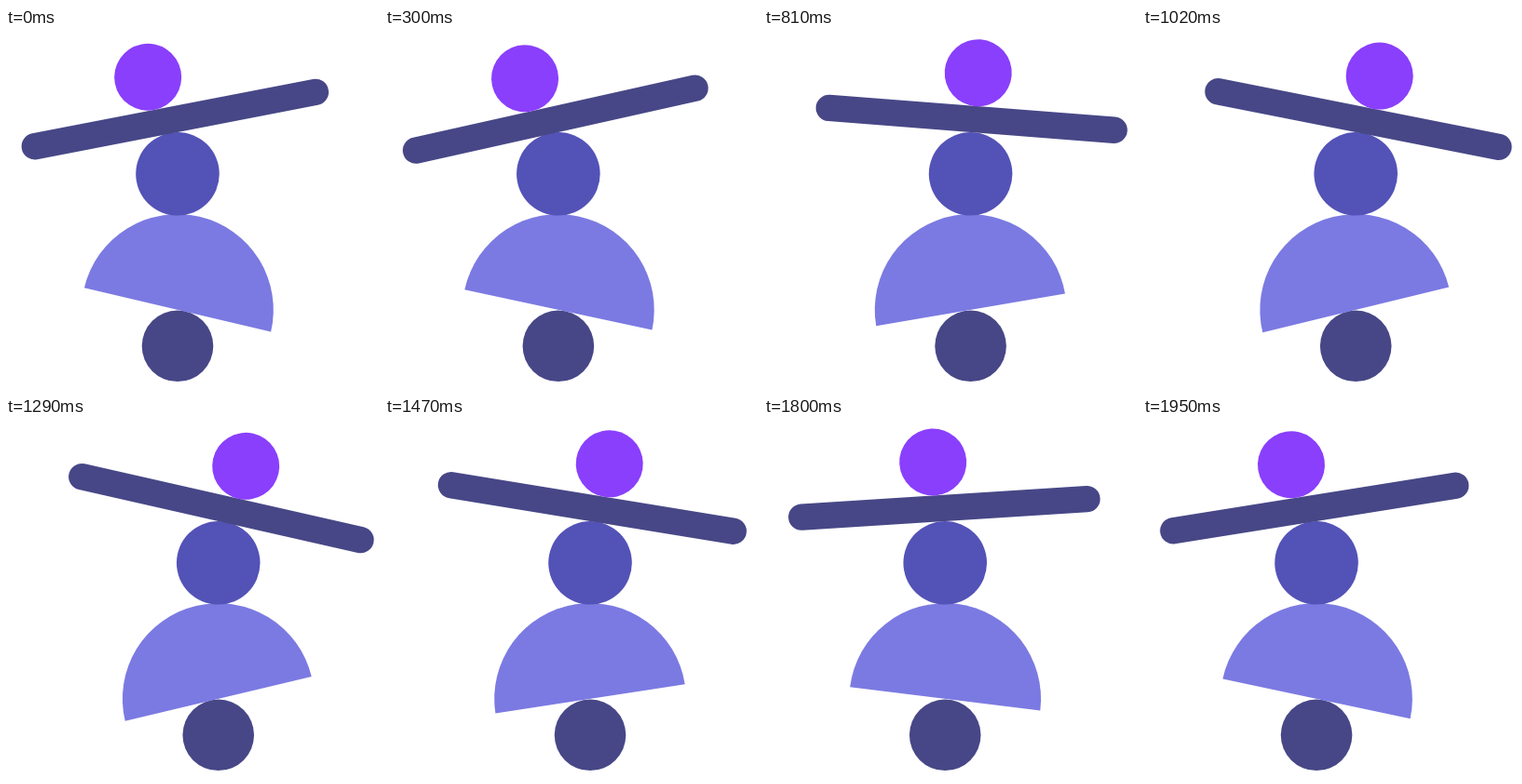
Recreate the animation shown at these times as an HTML page. Size 400x388 px, loop 1980 ms.

```html
<!DOCTYPE html>
<html lang="en">
<head>
<meta charset="utf-8">
<title>Balancing shapes</title>
<style>
  html, body { margin: 0; width: 100%; height: 100%; overflow: hidden; background: #fff; }
  svg { display: block; width: 400px; height: 388px; }
</style>
</head>
<body>
<svg viewBox="0 0 400 388">
  <g id="stack">
    <circle cy="341.5" r="38.3" fill="#474787"/>
    <path id="dome" d="M-102.8 0A102.8 102.8 0 0 1 102.8 0Z" fill="#7b7ae2"/>
    <circle cy="156.5" r="44.8" fill="#5352b7"/>
    <g id="seesaw">
      <path d="M-153.3-14H153.3" stroke="#474787" stroke-width="28.4" stroke-linecap="round"/>
      <circle id="ball" cy="-64" r="36" fill="#8a3ffc"/>
    </g>
  </g>
</svg>
<script>
const LOOP = 1980, STEP = 30;
const [stack, dome, seesaw, ball] =
  ['stack', 'dome', 'seesaw', 'ball'].map(id => document.getElementById(id));

// Times in ms: first departure, length of one swing, time from one departure to the next
const body = { start: 190, length: 830, every: 1045 };
const bar = { start: 225, length: 957, every: 1010 };

// Sine ease between 1 and -1 and back, resting at each end
function swing({ start, length, every }, t) {
  const n = Math.floor((t - start) / every);
  const u = Math.min(1, (t - start - n * every) / length);
  return Math.cos(Math.PI * (n + u));
}

function draw(now) {
  const t = Math.floor(now % LOOP / STEP) * STEP;
  const sway = swing(body, t), tilt = 13 * swing(bar, t);
  stack.setAttribute('transform', `translate(${206.1 - 22.1 * sway} 0.3)`);
  dome.setAttribute('transform', `translate(0 302.6) rotate(${13.5 * sway - 0.25})`);
  seesaw.setAttribute('transform', `translate(0 111.5) rotate(${-tilt})`);
  ball.setAttribute('cx', -3.5 - 1.5 * tilt);
}

const start = performance.now();
function frame() {
  draw(performance.now() - start);
  requestAnimationFrame(frame);
}
frame();
</script>
</body>
</html>
```
